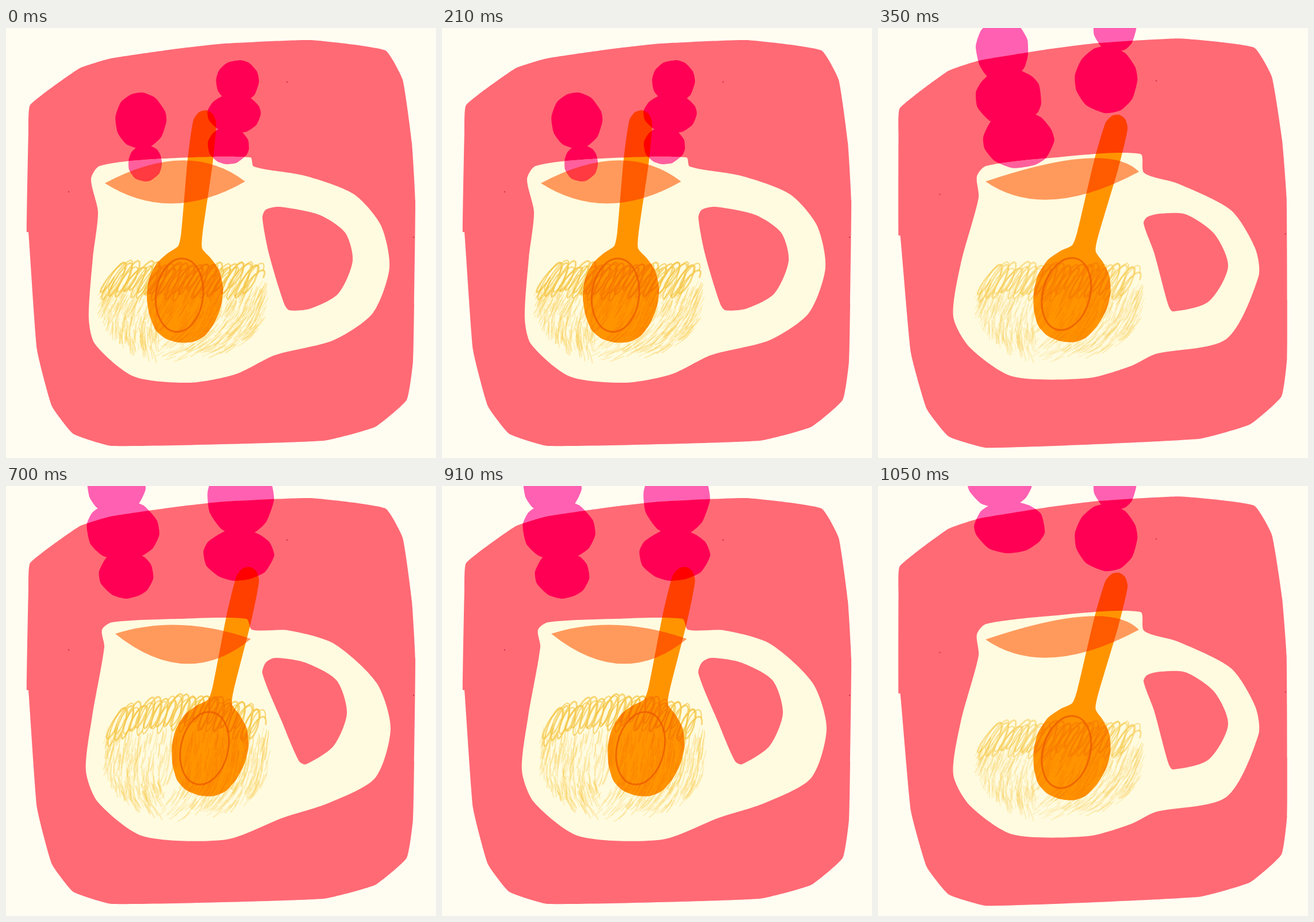
An HTML page with a canvas for the animation above (1.4 s loop, 748x748 px).

```html
<!DOCTYPE html>
<html lang="en">
<head>
<meta charset="utf-8">
<title>Hot drink</title>
<style>
html, body { margin: 0; width: 100%; height: 100%; overflow: hidden; background: #fffdf2; }
canvas { display: block; width: 100%; height: 100%; }
</style>
</head>
<body>
<canvas id="stage" width="748" height="748"></canvas>
<script>
const ctx = document.getElementById('stage').getContext('2d');
const SIZE = 748, STEP = 350, TAU = Math.PI * 2;
const PAPER = '#fffdf2', CARD = '#ff6a75', CREAM = '#fffbe0', TEA = '#ff9a5c';
const SPOON = '#ff9600', STEAM = '#ff60b2', STEAM_ON_CARD = '#ff0054';

function random(seed) {
  return () => {
    seed = (seed * 1664525 + 1013904223) % 4294967296;
    return seed / 4294967296;
  };
}

const points = text => text.trim().split(/\s+/).map(p => p.split(',').map(Number));

// Closed smooth outline through key points; a small bend leaves scissor facets.
function outline(pts, bend = 0.25, path = new Path2D()) {
  const at = i => pts[(i + pts.length) % pts.length];
  const handle = (i, reach) => {
    const [ax, ay] = at(i - 1), [bx, by] = at(i + 1), [x, y] = at(i);
    const k = reach / (Math.hypot(bx - ax, by - ay) || 1);
    return [x + (bx - ax) * k, y + (by - ay) * k];
  };
  path.moveTo(...at(0));
  pts.forEach((p, i) => {
    const q = at(i + 1);
    const reach = Math.hypot(q[0] - p[0], q[1] - p[1]) * bend;
    path.bezierCurveTo(...handle(i, reach), ...handle(i + 1, -reach), ...q);
  });
  path.closePath();
  return path;
}

// A puff of steam is a stack of roughly cut ellipses.
function puff(...blobs) {
  const path = new Path2D();
  blobs.forEach(([x, y, rx, ry]) => {
    const rnd = random(x * 31 + 7);
    const sides = Array.from({ length: 12 }, (_, i) => {
      const a = (i + rnd() * 0.4) / 12 * TAU;
      const r = 1 + rnd() * 0.03;
      return [x + rx * r * Math.cos(a), y + ry * r * Math.sin(a)];
    });
    outline(sides, 0.2, path);
  });
  return path;
}

// The outer edge runs clockwise and the hole counterclockwise.
const mug = (edge, hole) => outline(points(hole), 0.25, outline(points(edge)));

const card = outline(points(`42,134 128,70 182,53 298,36 380,27 530,21 660,39 690,90 706,200 712,300
  710,480 708,580 697,647 642,694 552,718 184,727 117,706 80,658 54,560 39,355 36,355 39,180`), 0.13);
const specks = points('488,93 108,284 708,363');

// Spoon: half widths along its length, mirrored about the axis, tip at the origin.
const profile = points(`0,0 5,12 20,20 90,22 215,18.5 240,21 255,38 275,55 305,65 335,65 365,57
  390,43 403,24 407,0`);
const spoon = outline([
  ...profile.map(([along, half]) => [half, along]),
  ...profile.slice(1, -1).reverse().map(([along, half]) => [-half, along])
], 0.22);

const upright = {
  turn: 0,
  mug: mug(`148,263 163,240 260,228 425,225 431,241 520,257 605,289 652,343 667,417 638,496 570,543
    468,569 400,602 320,617 222,606 155,550 144,505 151,400 160,320`,
    '446,330 458,395 484,480 493,491 530,488 578,462 603,405 590,356 545,325 475,311 452,316'),
  tea: new Path2D('M172 270Q318 192 416 267Q285 342 172 270'),
  spoon: { tip: [348, 143], tilt: 0.115 },
  pencil: { x: 308, top: 402, arch: 0, lean: 0.45, ink: 0.6 }
};
const tilted = {
  turn: -Math.PI / 180,
  mug: mug(`172,258 188,240 300,226 456,219 463,252 520,270 614,317 656,383 662,432 606,541 483,567
    440,588 366,609 234,606 160,556 131,502 144,410 175,295`,
    '462,340 480,390 505,482 513,493 575,476 609,415 585,358 535,324 490,323 468,329'),
  tea: new Path2D('M187 267Q400 195 454 250Q290 338 187 267'),
  spoon: { tip: [420, 151], tilt: 0.26 },
  pencil: { x: 316, top: 406, arch: 4, lean: 0.4, ink: 0.45 }
};
const lifted = {
  turn: 0,
  mug: mug(`167,250 185,237 300,231 418,231 428,250 490,251 570,274 645,343 669,422 642,508 560,552
    482,577 383,615 238,609 160,550 139,495 150,400 171,280`,
    '446,326 480,410 510,479 522,484 570,452 593,395 575,338 520,307 468,299 452,307'),
  tea: new Path2D('M190 257Q300 222 426 266Q315 357 190 257'),
  spoon: { tip: [425, 141], tilt: 0.22 },
  pencil: { x: 314, top: 383, arch: 28, lean: 0.16, ink: 0.6 }
};

const rightPuff = puff([412, -2, 37, 44], [397, 90, 54, 58]);
const steps = [
  { cup: upright, steam: [
    puff([234, 161, 44, 48], [242, 235, 29, 32]),
    puff([403, 93, 37, 37], [397, 149, 46, 34], [387, 205, 36, 32])] },
  { cup: tilted, steam: [
    puff([216, 38, 45, 55], [228, 121, 57, 50], [244, 194, 61, 49]), rightPuff] },
  { cup: lifted, steam: [
    puff([192, 0, 50, 49], [203, 77, 63, 52], [209, 154, 47, 41]),
    puff([408, 22, 58, 63], [404, 120, 61, 44])] },
  { cup: tilted, steam: [
    puff([212, -6, 56, 44], [229, 71, 61, 45]), rightPuff] }
];

function paint(color, shape, blend = 'source-over') {
  ctx.globalCompositeOperation = blend;
  ctx.fillStyle = color;
  ctx.fill(shape);
  ctx.globalCompositeOperation = 'source-over';
}

function inside(area, draw) {
  ctx.save();
  ctx.clip(area);
  draw();
  ctx.restore();
}

function turned(angle, [x, y], draw) {
  ctx.save();
  ctx.translate(x, y);
  ctx.rotate(angle);
  draw();
  ctx.restore();
}

function drawHatch({ x: cx, top, lean, ink }, rnd) {
  const floorY = 488, rx = 142, ry = 88;
  ctx.strokeStyle = `rgba(249,208,92,${ink * 0.6})`;
  for (let i = 0; i < 620; i++) {
    const u = rnd() * 2 - 1;
    const bottom = floorY + ry * Math.sqrt(1 - u * u);
    const x = cx + rx * u;
    const y = top + 50 + (bottom - top - 50) * rnd();
    const low = Math.max(0, (y - floorY) / ry);
    const angle = lean + low * (u > -0.3 ? 0.7 : -0.9) + (rnd() - 0.5) * 0.25;
    const half = 7 + rnd() * 9;
    const dx = Math.sin(angle) * half, dy = Math.cos(angle) * half;
    ctx.lineWidth = 1 + rnd() * 1.4;
    ctx.beginPath();
    ctx.moveTo(x + dx, y - dy);
    ctx.quadraticCurveTo(x + 2, y, x - dx, y + dy);
    ctx.stroke();
  }
}

function drawLoops({ x: cx, top, arch, lean, ink }, rnd) {
  const reach = 128, count = 21, parts = 16;
  ctx.strokeStyle = `rgba(244,190,48,${ink})`;
  for (let pass = 0; pass < 2; pass++) {
    ctx.lineWidth = 3 - pass;
    ctx.beginPath();
    for (let i = 0; i < count; i++) {
      const height = 20 + rnd() * 13, slant = 4 + lean * 18 + rnd() * 6, drop = rnd() * 14 - 4;
      for (let k = 0; k < parts; k++) {
        const a = k / parts * TAU;
        const u = (i + k / parts) / count;
        const y = top + 32 + drop - arch * Math.sin(Math.PI * u);
        ctx.lineTo(cx + reach * (2 * u - 1) + 8 * Math.cos(a) - slant * Math.sin(a),
          y + height * Math.sin(a));
      }
    }
    ctx.stroke();
  }
}

function drawSpoon({ tip, tilt }) {
  turned(tilt, tip, () => {
    paint(SPOON, spoon, 'multiply');
    ctx.strokeStyle = 'rgba(235,88,0,.75)';
    ctx.lineWidth = 3;
    ctx.beginPath();
    ctx.ellipse(-9, 325, 41, 64, 0, 0, TAU);
    ctx.stroke();
  });
}

function drawCard(steam, turn) {
  const center = [SIZE / 2, SIZE / 2];
  const back = [-center[0], -center[1]];
  const onCard = draw => turned(turn, center, () => turned(0, back, draw));
  onCard(() => {
    paint(CARD, card);
    ctx.fillStyle = '#c9304c';
    specks.forEach(([x, y]) => ctx.fillRect(x, y, 2, 2));
    inside(card, () => turned(0, center, () => turned(-turn, [0, 0], () =>
      turned(0, back, () => steam.forEach(p => paint(STEAM_ON_CARD, p))))));
  });
}

function drawStep({ cup, steam }) {
  const rnd = random(17);
  ctx.fillStyle = PAPER;
  ctx.fillRect(0, 0, SIZE, SIZE);
  steam.forEach(p => paint(STEAM, p));
  drawCard(steam, cup.turn);

  paint(CREAM, cup.mug);
  paint(TEA, cup.tea);
  inside(cup.mug, () => steam.forEach(p => paint(STEAM, p, 'multiply')));

  ctx.lineJoin = ctx.lineCap = 'round';
  drawHatch(cup.pencil, rnd);
  drawLoops(cup.pencil, rnd);
  drawSpoon(cup.spoon);
}

const start = performance.now();
let shown = -1;
function tick() {
  const index = Math.floor((performance.now() - start) / STEP) % steps.length;
  if (index !== shown) drawStep(steps[shown = index]);
  requestAnimationFrame(tick);
}
tick();
</script>
</body>
</html>
```
